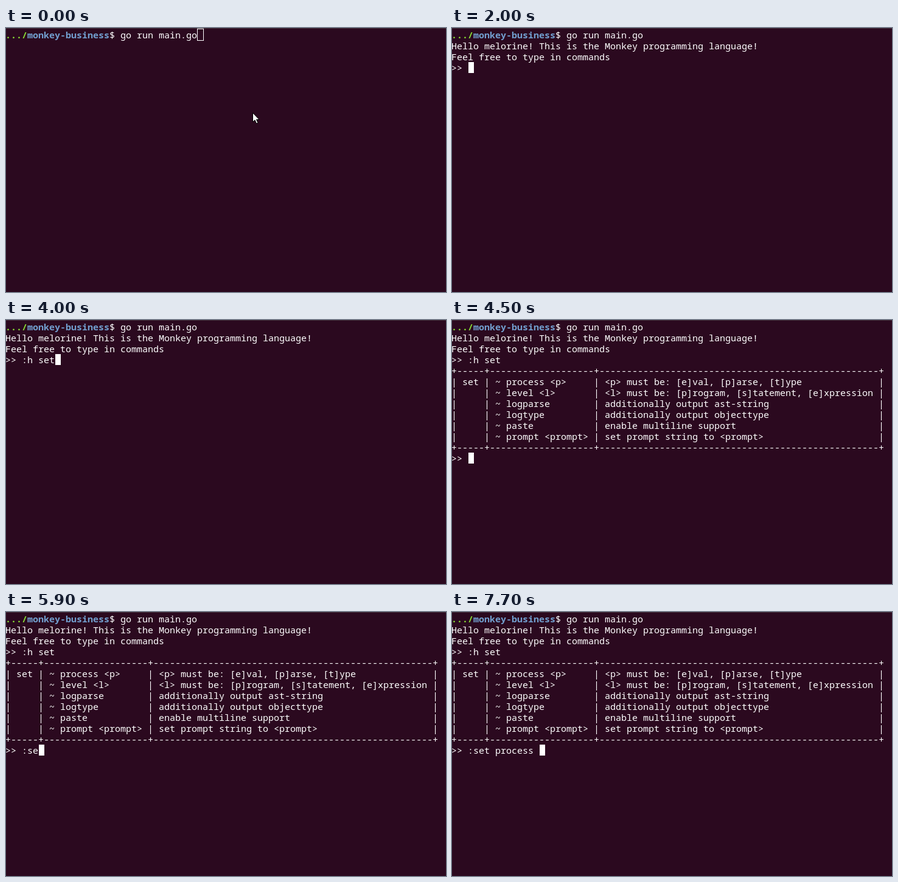
An HTML page with a canvas for the animation above (8000 ms loop, 723 by 434 pixels).

```html
<!DOCTYPE html>
<html lang="en">
<head>
<meta charset="utf-8">
<title>Terminal session</title>
<style>
  html, body { margin: 0; overflow: hidden; background: #2b091f; }
  canvas { display: block; }
</style>
</head>
<body>
<canvas width="723" height="434"></canvas>
<script>
const ctx = document.querySelector('canvas').getContext('2d');
const LOOP = 8000, CELL_W = 9, CELL_H = 18, TOP = 2;
const FONT = '15px "Noto Sans Mono", monospace';
const WHITE = '#fff';

const GREETING = [
  'Hello melorine! This is the Monkey programming language!',
  'Feel free to type in commands',
];

const rule = '+' + [5, 19, 51].map(n => '-'.repeat(n)).join('+') + '+';
const HELP = [
  rule,
  ...[
    ['set', 'process <p>', '<p> must be: [e]val, [p]arse, [t]ype'],
    ['', 'level <l>', '<l> must be: [p]rogram, [s]tatement, [e]xpression'],
    ['', 'logparse', 'additionally output ast-string'],
    ['', 'logtype', 'additionally output objecttype'],
    ['', 'paste', 'enable multiline support'],
    ['', 'prompt <prompt>', 'set prompt string to <prompt>'],
  ].map(([group, option, info]) =>
    `| ${group.padEnd(3)} | ~ ${option.padEnd(15)} | ${info.padEnd(49)} |`),
  rule,
];

// Each command is typed one character per key time.
const FIRST = { text: ':h set', keys: [3000, 3400, 3500, 3600, 3700, 4000] };
const SECOND = {
  text: ':set process ',
  keys: [5500, 5900, 5900, 6100, 6300, 6600, 6700, 6800, 7000, 7100, 7300, 7500, 7700],
};
// Spans in which the cursor is blinked off.
const BLINKS = [[700, 800], [1200, 1600], [2200, 2400], [4800, 4900]];

const typed = ({ text, keys }, t) => '>> ' + text.slice(0, keys.filter(k => k <= t).length);

function write(text, col, row, color = WHITE, weight = 500) {
  ctx.font = `${weight} ${FONT}`;
  ctx.fillStyle = color;
  ctx.fillText(text, col * CELL_W - 1, TOP + row * CELL_H + 15);
}

function drawCursor(col, row, t) {
  const x = col * CELL_W, y = TOP + row * CELL_H;
  if (t < 700) {
    ctx.strokeStyle = WHITE;
    ctx.lineWidth = 1;
    ctx.strokeRect(x - 0.5, y - 0.5, 10, 19);
  } else if (!BLINKS.some(([from, to]) => t >= from && t < to)) {
    ctx.fillStyle = WHITE;
    ctx.fillRect(x, y, CELL_W, CELL_H);
  }
}

function drawPointer(t) {
  ctx.strokeStyle = '#000';
  ctx.fillStyle = WHITE;
  if (t < 500) {
    const arrow = new Path2D('M405.5 139.5V154.5L409 151.3L411.5 157L414 156L411.5 150.5H416Z');
    ctx.lineWidth = 1;
    ctx.fill(arrow);
    ctx.stroke(arrow);
  } else if (t < 1600) {
    const beam = new Path2D('M405 134.5H410M407.5 134.5V147.5M405 147.5H410');
    ctx.lineWidth = 3;
    ctx.stroke(beam);
    ctx.strokeStyle = WHITE;
    ctx.lineWidth = 1;
    ctx.stroke(beam);
  }
}

function draw(t) {
  ctx.fillStyle = '#2b091f';
  ctx.fillRect(0, 0, 723, 434);
  ctx.fillStyle = '#43323b';
  ctx.fillRect(0, 0, 723, 1);

  write('.../', 0, 0, '#8ae234', 'bold');
  write('monkey-business', 4, 0, '#729fcf', 'bold');
  write('$ go run main.go', 19, 0);

  const lines = [];
  if (t >= 2000) lines.push(...GREETING, typed(FIRST, t));
  if (t >= 4500) lines.push(...HELP, typed(SECOND, t));
  lines.forEach((line, i) => write(line, 0, i + 1));

  if (lines.length) drawCursor(lines.at(-1).length, lines.length, t);
  else if (t >= 1900) drawCursor(0, 1, t);
  else drawCursor(35, 0, t);
  drawPointer(t);
}

const start = performance.now();
function tick() {
  draw((performance.now() - start) % LOOP);
  requestAnimationFrame(tick);
}
tick();
</script>
</body>
</html>
```
